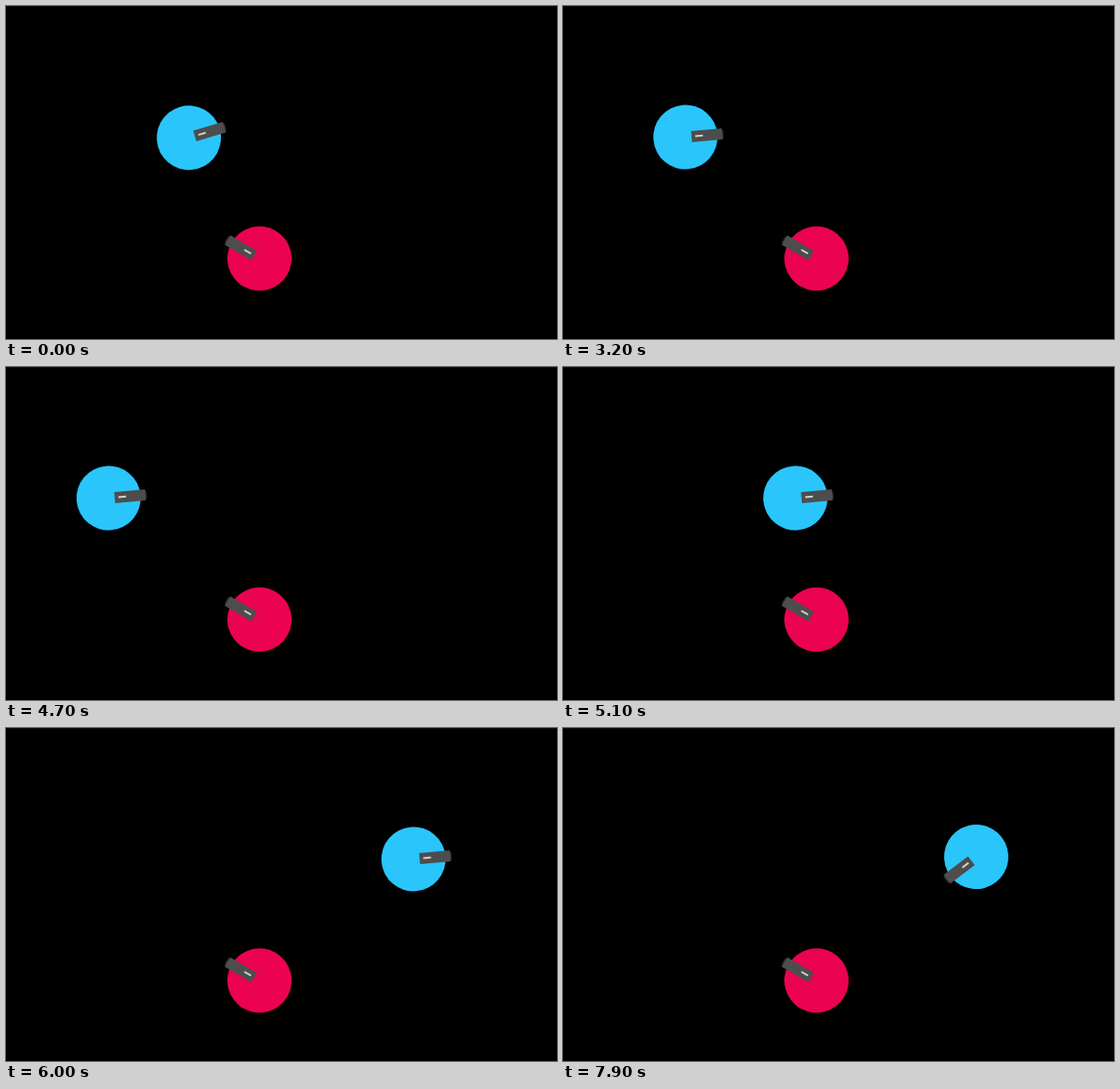
These frames come from a looping animation (600 px wide and 362 px high, 8000 ms). An HTML page:

```html
<!DOCTYPE html>
<html lang="en">
<head>
<meta charset="utf-8">
<title>Two players</title>
<style>
  html, body { margin: 0; width: 100%; height: 100%; overflow: hidden; background: #000; }
  svg { display: block; width: 600px; height: 362px; }
</style>
</head>
<body>
<svg viewBox="0 0 600 362">
  <defs>
    <!-- pivot at the origin, barrel along +x -->
    <g id="player">
      <circle cx="-3.5" r="35"/>
      <rect x="35" y="-4" width="3.2" height="8" fill="#292929"/>
      <rect x="3.2" y="-6" width="33.6" height="12" fill="#4d4d4d"/>
      <rect x="7.2" y="-1" width="8.4" height="2" fill="#d2d2d2"/>
    </g>
  </defs>
  <rect width="600" height="362"/>
  <rect width="600" height="1" fill="#0d0d0d"/>
  <use id="blue" href="#player" fill="#29c5fb"/>
  <use id="red" href="#player" fill="#eb0250"/>
</svg>
<script>
const LOOP = 8000, STEP = 100;
const linear = p => p;
const sine = p => (1 - Math.cos(Math.PI * p)) / 2;
const lateSine = p => sine(p ** 1.41);
const gather = p => p ** 1.25;

// start, end, value reached, easing
const slide = [
  [2700, 3600, 38.6, lateSine],
  [4365, 5217, 267, sine],
  [5217, 6000, 447.2, sine]
];
const turn = [
  [0, 200, -11, linear],
  [900, 1200, -5, linear],
  [6100, 7900, -217.5, gather]
];

function valueAt(first, moves, t) {
  let v = first;
  for (const [start, end, to, ease] of moves) {
    const p = Math.min(1, Math.max(0, (t - start) / (end - start)));
    v += (to - v) * ease(p);
  }
  return v;
}

function place(id, x, y, angle) {
  document.getElementById(id)
    .setAttribute("transform", `translate(${x} ${y}) rotate(${angle})`);
}

function draw(t) {
  place("blue", valueAt(202.5, slide, t), 142.2, valueAt(-16.5, turn, t));
}

place("red", 273, 272.8, 210);
draw(0);

const begin = performance.now();
function tick() {
  const t = (performance.now() - begin) % LOOP;
  draw(Math.floor(t / STEP) * STEP);
  requestAnimationFrame(tick);
}
requestAnimationFrame(tick);
</script>
</body>
</html>
```
